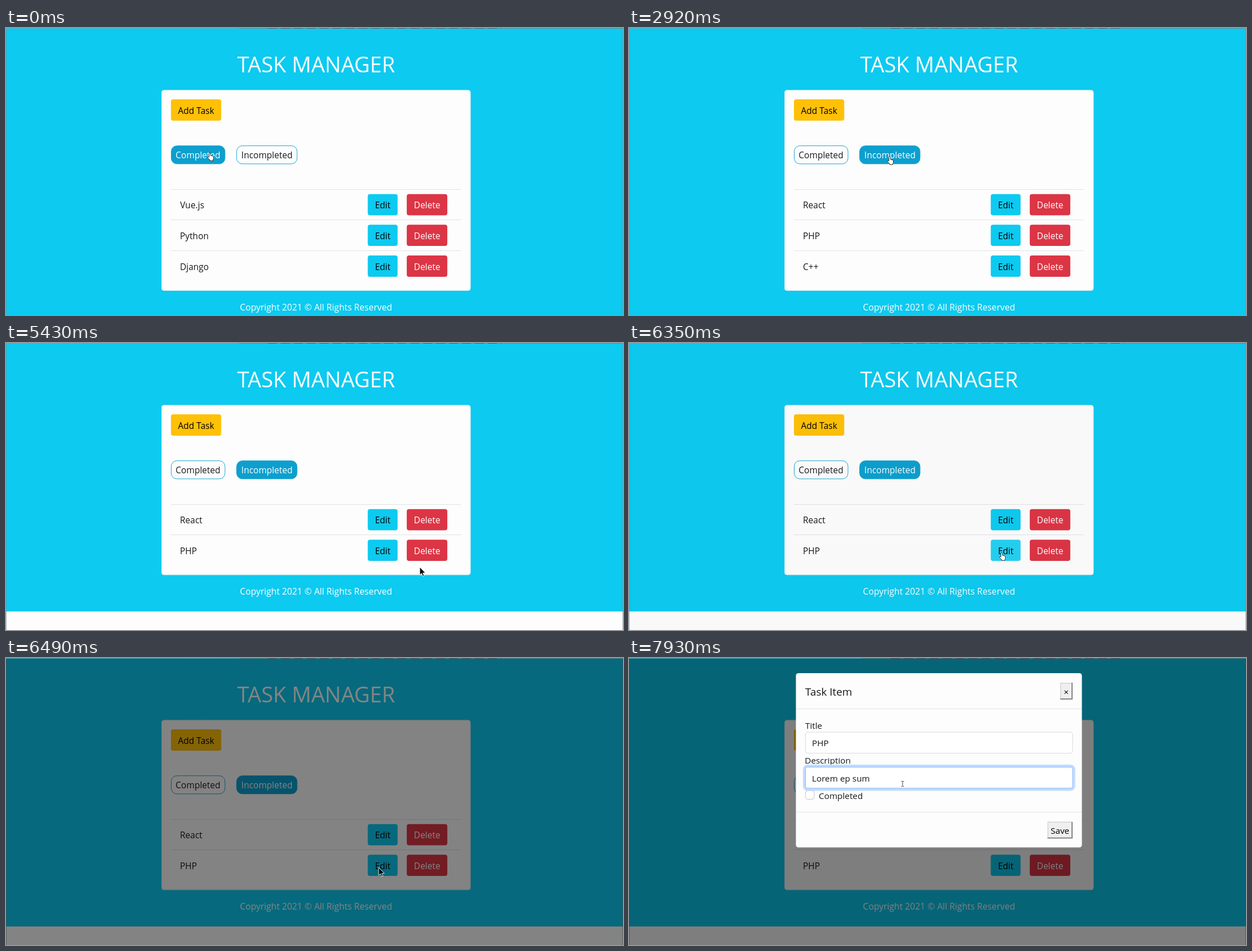
Animation of 1096x511 px, one loop 8000 ms. Source, as an HTML page:

```html
<!DOCTYPE html>
<html lang="en">
<head>
<meta charset="utf-8">
<title>Task Manager</title>
<style>
  html, body { margin: 0; width: 100%; height: 100%; overflow: hidden; background: #fdfdfd; }
  svg { display: block; width: 100%; height: 100%; }
  text { font: 15.5px "Open Sans", "Noto Sans", sans-serif; fill: #16191c; }
  .mid { text-anchor: middle; }
  .light { fill: #fff; }
  .black { fill: #000; }
  .rule { stroke: #dee2e6; }
  .edit { fill: #0dcaf0; }
  .del { fill: #dc3545; }
  .field { fill: #fff; stroke: #d5d9de; }
  .modal text { font-size: 15.3px; }
  .face { fill: #efefef; }
  .hi { fill: none; stroke: #d6d6d6; stroke-width: 1.5; }
  .lo { fill: none; stroke: #858585; stroke-width: 2; }

  /* One 8 s loop: 1% = 80 ms */
  .step { animation: 8s step-end infinite; }
  .flow { animation: 8s linear infinite; }

  /* Filter switch */
  .pill { stroke: #1ca4d0; }
  .pill1 { animation-name: pillOff; }
  .pill2 { animation-name: pillOn; }
  .label1 { animation-name: labelOff; }
  .label2 { animation-name: labelOn; }
  .done { animation-name: hide; }
  .todo { animation-name: show; }
  @keyframes pillOff { 0% { fill: #0d9fce } 36.5%, 100% { fill: #fdfdfd } }
  @keyframes pillOn { 0% { fill: #fdfdfd } 36.5%, 100% { fill: #0d9fce } }
  @keyframes labelOff { 0% { fill: #fff } 36.5%, 100% { fill: #16191c } }
  @keyframes labelOn { 0% { fill: #16191c } 36.5%, 100% { fill: #fff } }
  @keyframes hide { 0% { opacity: 1 } 36.5%, 100% { opacity: 0 } }
  @keyframes show { 0% { opacity: 0 } 36.5%, 100% { opacity: 1 } }

  /* Deleted row */
  .page { animation-name: page; }
  .card { animation-name: card; }
  .foot { animation-name: foot; }
  .last { animation-name: last; }
  @keyframes page { 0% { height: 532px } 62.25%, 100% { height: 478px } }
  @keyframes card { 0% { height: 356.6px } 62.25%, 100% { height: 302px } }
  @keyframes foot { 0% { transform: none } 62.25%, 100% { transform: translateY(-54.7px) } }
  @keyframes last { 0% { opacity: 1 } 62.25%, 100% { opacity: 0 } }

  /* Button hovers */
  .hover1 { animation-name: hover1; }
  .hover2 { animation-name: hover2; }
  .hover3 { animation-name: hover3; }
  @keyframes hover1 { 0%, 53.6% { fill: #dc3545 } 55.25%, 56.06% { fill: #bf2f3d } 57.7%, 100% { fill: #dc3545 } }
  @keyframes hover2 { 0%, 55.3% { fill: #dc3545 } 57%, 100% { fill: #bb2d3b } }
  @keyframes hover3 { 0%, 72% { fill: #0dcaf0 } 73.75%, 79% { fill: #31d2f2 } 80.3%, 100% { fill: #0dcaf0 } }

  /* Dialog */
  .shade { animation-name: shade; }
  .modal { animation: fade 8s linear infinite, drop 8s linear infinite; }
  .ring { animation-name: ring; }
  .caret { animation-name: caret; }
  @keyframes shade { 0%, 79.325% { opacity: 0 } 81.2%, 100% { opacity: .5 } }
  @keyframes fade { 0%, 81.125% { opacity: 0 } 83%, 100% { opacity: 1 } }
  @keyframes drop {
    0% { transform: translateY(-51px) }
    81.125% { transform: translateY(-51px); animation-timing-function: ease-out }
    84.875%, 100% { transform: none }
  }
  @keyframes ring { 0%, 92.5% { opacity: 0 } 93.9%, 100% { opacity: 1 } }
  @keyframes caret { 0% { opacity: 0 } 92.5% { opacity: 1 } 99.125%, 100% { opacity: 0 } }

  /* Pointer */
  .pointer { animation: move 8s step-end infinite; }
  .hand { animation-name: hand; }
  .arrow { animation-name: arrow; }
  .beam { animation-name: beam; }
  @keyframes move {
    0% { transform: translate(362px, 222px) }
    3.75% { transform: translate(362px, 222px); animation-timing-function: steps(3, jump-start) }
    6.75% { transform: translate(466px, 221px) }
    11.875% { transform: translate(466px, 221px); animation-timing-function: steps(3, jump-start) }
    14.875% { transform: translate(463px, 229px) }
    47.125% { transform: translate(463px, 229px); animation-timing-function: steps(4, jump-start) }
    50.375% { transform: translate(560px, 280px); animation-timing-function: steps(5, jump-start) }
    54.4375% { transform: translate(714px, 366px); animation-timing-function: steps(2, jump-start) }
    56.0625% { transform: translate(729px, 418px); animation-timing-function: steps(2, jump-start) }
    57.6875% { transform: translate(747px, 419px) }
    57.875% { transform: translate(762px, 420px) }
    59.625% { transform: translate(763px, 421px) }
    67.875% { transform: translate(735px, 399px); animation-timing-function: steps(7, jump-end) }
    74.4% { transform: translate(662px, 373px) }
    81.25% { transform: translate(662px, 373px); animation-timing-function: steps(3, jump-start) }
    83.75% { transform: translate(527px, 328px); animation-timing-function: steps(4, jump-start) }
    87% { transform: translate(502px, 231px); animation-timing-function: steps(5, jump-start) }
    91.25%, 100% { transform: translate(486px, 224px) }
  }
  @keyframes hand {
    0% { opacity: 1 } 48.75% { opacity: 0 } 53.6% { opacity: 1 }
    62.25% { opacity: 0 } 72% { opacity: 1 } 79.5%, 100% { opacity: 0 }
  }
  @keyframes arrow {
    0% { opacity: 0 } 48.75% { opacity: 1 } 53.6% { opacity: 0 }
    62.25% { opacity: 1 } 72% { opacity: 0 } 79.5% { opacity: 1 } 87%, 100% { opacity: 0 }
  }
  @keyframes beam { 0% { opacity: 0 } 87%, 100% { opacity: 1 } }
</style>
</head>
<body>
<svg viewBox="0 0 1096 511" preserveAspectRatio="none">
  <defs>
    <g id="labels">
      <text class="mid black" x="669.2" y="321.2">Edit</text>
      <text class="mid light" x="748" y="321.2">Delete</text>
    </g>
  </defs>

  <rect width="1096" height="511" fill="#fdfdfd"/>
  <rect class="page step" width="1096" fill="#0dcaf0"/>
  <text class="mid light" x="551" y="79" style="font-size:38.2px">TASK MANAGER</text>
  <rect class="card step" x="276.5" y="110.8" width="548.5" rx="4" fill="#fdfdfd" stroke="#d3e9ee"/>

  <rect x="293" y="127" width="89.3" height="38" rx="4" fill="#ffc107"/>
  <text class="mid black" x="337.7" y="153">Add Task</text>

  <rect class="pill pill1 step" x="293.5" y="209.7" width="95.5" height="32.2" rx="10"/>
  <text class="mid label1 step" x="341" y="232.3">Completed</text>
  <rect class="pill pill2 step" x="409.7" y="209.7" width="107.3" height="32.2" rx="10"/>
  <text class="mid label2 step" x="463.5" y="232.3">Incompleted</text>

  <g>
    <path class="rule" d="M293 287.5H808"/>
    <rect class="edit" x="642.6" y="295.8" width="53" height="37.7" rx="4"/>
    <rect class="del" x="711.9" y="295.8" width="72" height="37.7" rx="4"/>
    <use href="#labels"/>
    <text class="done step" x="309.3" y="321.4">Vue.js</text>
    <text class="todo step" x="309" y="321.4">React</text>
  </g>
  <g transform="translate(0 54.5)">
    <path class="rule" d="M293 287H808"/>
    <rect class="edit hover3 flow" x="642.6" y="295.7" width="53" height="37.8" rx="4"/>
    <rect class="del hover1 flow" x="711.9" y="295.7" width="72" height="37.8" rx="4"/>
    <use href="#labels"/>
    <text class="done step" x="309" y="321.4">Python</text>
    <text class="todo step" x="309" y="321.4">PHP</text>
  </g>
  <g class="last step">
    <g transform="translate(0 109.4)">
      <path class="rule" d="M293 287.1H808"/>
      <rect class="edit" x="642.6" y="295.7" width="53" height="37.8" rx="4"/>
      <rect class="del hover2 flow" x="711.9" y="295.7" width="72" height="37.8" rx="4"/>
      <use href="#labels"/>
      <text class="done step" x="309" y="321.6">Django</text>
      <text class="todo step" x="309" y="321.6">C++</text>
    </g>
  </g>
  <text class="mid light foot step" x="550.7" y="503" style="font-size:15.7px">Copyright 2021 © All Rights Reserved</text>

  <path d="M.5 1V511M1095.5 1V511" stroke="#7a8f96" stroke-opacity=".6"/>
  <rect class="shade flow" y="1" width="1096" height="510"/>

  <g class="modal">
    <rect x="296.5" y="27" width="508" height="310.3" rx="4.5" fill="#fdfdfd"/>
    <path class="rule" d="M297 90.5H804M297 274.5H804"/>
    <text x="313" y="67" style="font-size:18.9px">Task Item</text>

    <rect class="face" x="766" y="44" width="22" height="30"/>
    <path class="hi" d="M766.7 74V44.7H788"/>
    <path class="lo" d="M787 44V73H766"/>
    <text class="mid black" x="776.6" y="66">×</text>

    <text x="313" y="126">Title</text>
    <rect class="field" x="313.5" y="132" width="474.5" height="37.5" rx="4"/>
    <text x="325" y="157">PHP</text>

    <text x="312.3" y="188.3">Description</text>
    <rect class="field" x="313.5" y="194.3" width="474.5" height="37.5" rx="4"/>
    <g class="ring flow">
      <rect x="311.2" y="192" width="479.2" height="42.2" rx="6" fill="none" stroke="#c2dbfe" stroke-width="4.4"/>
      <rect x="313.5" y="194.3" width="474.5" height="37.5" rx="4" fill="#fff" stroke="#86b7fe"/>
    </g>
    <text x="325" y="219.6">Lorem ep sum</text>
    <rect class="caret step" x="428" y="202" width="1" height="22"/>

    <rect class="field" x="313.5" y="236" width="15.5" height="15.5" rx="4" style="stroke:#c3c3c3"/>
    <text x="337" y="250.7">Completed</text>

    <rect class="face" x="743.5" y="291.5" width="44.5" height="30"/>
    <path class="hi" d="M744.2 321.5V292.2H788"/>
    <path class="lo" d="M787 292V320.5H743.5"/>
    <text class="mid black" x="765.6" y="313">Save</text>
  </g>

  <path d="M0 .5H414" stroke="#62a9ba"/>
  <path d="M414 .5H1096" stroke="#70868c"/>
  <path d="M465 .5H880" stroke="#754f52" stroke-dasharray="16 7"/>

  <g class="pointer">
    <path class="hand step" fill="#fff" stroke="#222" stroke-width=".9"
      d="M-1.3 1.3a1.3 1.3 0 0 1 2.6 0v3.7l3.6.8q1.6.4 1.6 2v2.7q0 1.5-1 2.5v1.4h-5v-1.3L-3.6 9.2q-1-1.3.2-2 1-.4 2.1.9z"/>
    <path class="arrow step" fill="#000" stroke="#fff" stroke-width=".9"
      d="M0 0V14.2L3.2 11.2 5.4 16.2 7.7 15.2 5.5 10.4H10Z"/>
    <path class="beam step" fill="none" stroke="#444" d="M-2.5-4.5H-.5L0-4 .5-4.5H2.5M0-4V4M-2.5 4.5H-.5L0 4 .5 4.5H2.5"/>
  </g>
</svg>
</body>
</html>
```
